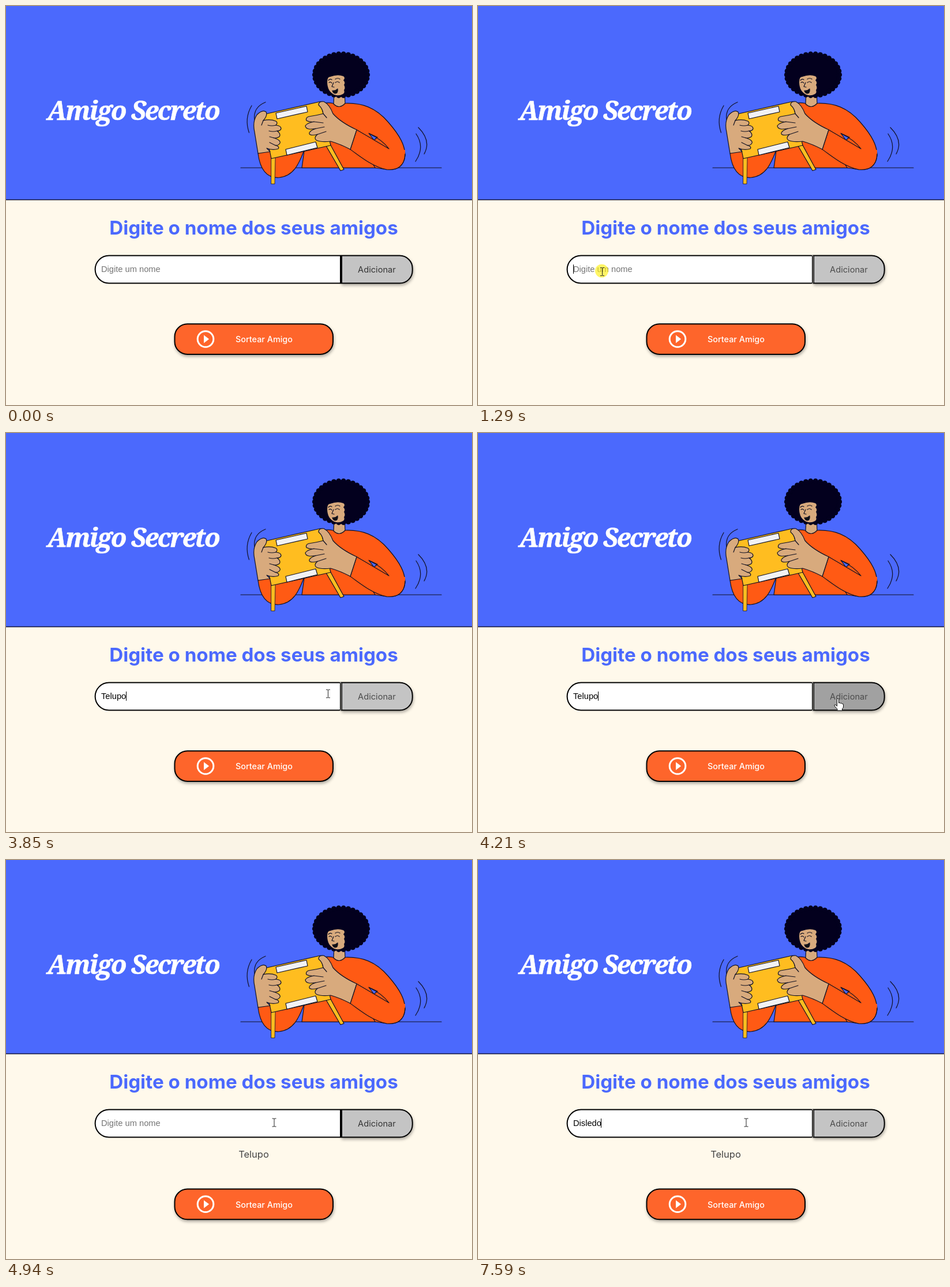
Animation of 808x693 px, one loop 8 s. Source, as an HTML page:

```html
<!DOCTYPE html>
<html lang="pt-BR">
<head>
<meta charset="utf-8">
<title>Amigo Secreto</title>
<style>
  html, body { margin: 0; width: 100%; height: 100%; overflow: hidden; background: #fff9eb; }
  svg { display: block; width: 100%; height: 100%; }
  text { font-family: Inter, "Open Sans", sans-serif; font-size: 14.67px; white-space: pre; }
  .title { font: italic 800 45px Merriweather, "Noto Serif", serif; letter-spacing: -2.3px; fill: #fff; stroke: #fff; stroke-width: .6; }
  .heading { font-size: 33.15px; font-weight: 700; fill: #4b69fd; }
  .field { font-family: Arial, "Liberation Sans", sans-serif; }
  .item { font-size: 16.5px; fill: #444; }
  .action { font-size: 14.4px; font-weight: 500; fill: #fff; }
  .mid { text-anchor: middle; }
  .art { stroke: #111122; stroke-width: 1.2; stroke-linejoin: round; stroke-linecap: round; fill: none; }
  .shirt { fill: #ff5a14; }
  .skin { fill: #d8aa7d; }
  .box { fill: #ffbd20; }
  .tape { fill: #f2f2f4; }
  .edge { stroke: #000; stroke-width: 2; }
  .drop { filter: drop-shadow(1px 3px 2.5px rgba(0, 0, 0, .32)); }
</style>
</head>
<body>
<svg viewBox="0 0 808 693">
  <rect width="808" height="693" fill="#fff9eb"/>
  <rect width="808" height="336" fill="#4b69fd"/>
  <rect y="335.8" width="808" height="1.5" fill="#10143c"/>
  <text class="title mid" x="220.500" y="198">Amigo Secreto</text>

  <g class="art">
    <path d="M407 281H755"/>
    <path d="M426 173Q413 195 421.500 220M450 167Q428 176 431 198"/>
    <path d="M711 222Q727 245 710 270M715 211Q738 234 725 257"/>
    <!-- arm and torso -->
    <path class="shirt" d="M437 256C440 280 449 299 473 298C498 296 508 275 517 250L465 250Z"/>
    <path class="shirt" d="M513 281L518 245L545 170Q556 167 567 169Q577 178 588 169C617 168 641 176 663 202C684 226 692 243 692 260C690 279 677 286 660 284L640 281Z"/>
    <path fill="#4b69fd" d="M629 221L644 228L638 233Z"/>
    <path class="shirt" stroke="none" d="M608 215L664 248L692 250C693 276 681 286 660 284C637 278 615 262 597 249Z"/>
    <path d="M664 248Q652 232 630 222M664 248L608 215L597 249C617 264 638 280 660 284C680 286 691 277 692 257M637 276L640 281"/>
    <!-- head -->
    <path class="skin" d="M569 150L568 170Q578 180 588 169L587 148Z"/>
    <g id="hair" fill="#03001e" stroke="none"><ellipse cx="581" cy="120" rx="47" ry="38"/></g>
    <path class="skin" stroke="none" d="M557 132Q557 123 562 123Q575 118 585 122Q589 125 585 129Q589 133 586 137Q589 142 586 146Q588 151 584 153Q577 157 569 154Q557 148 557 132Z"/>
    <path d="M559 129Q562 126 565 128M571 127Q575 124 579 127M560 133Q563 131 565 134M571 133Q575 130 578 133M568 133L565 140L569 141"/>
    <path fill="#111" d="M566 147Q571 148 575 144Q576 151 571 152Q567 151 566 147Z"/>
    <!-- box -->
    <path class="box" d="M460 264L467 263L466 309L460 309Z" stroke-width=".8"/>
    <path class="box" d="M555 243L562 240L586 284L580 286Z"/>
    <path class="box" d="M444 189L545 166L563 242L460 265Z"/>
    <path class="tape" d="M468 186L521 174L523 184L470 196Z"/>
    <path class="tape" d="M485 249L537 236L540 246L487 259Z"/>
    <!-- hands -->
    <path class="skin" d="M437 256L431 219Q427 201 435 189Q445 179 451 184Q454 190 446 199Q458 196 468 200Q472 203 468 207Q477 208 477 213Q476 217 470 217Q477 222 474 227Q470 230 464 229Q477 233 475 238Q472 243 467 242Q475 244 472 248Q462 251 452 247L458 253Z"/>
    <path d="M446 199L443 207M468 207Q461 209 454 207M470 217Q463 219 456 217M464 229L457 227M467 242L457 237"/>
    <path class="skin" d="M608 215Q580 202 567 187Q561 171 551 166Q542 165 542 172Q549 178 550 187Q539 190 525 192Q519 194 521 199Q526 202 534 201Q522 203 519 208Q519 213 527 214L537 213Q525 217 526 222Q528 226 540 223Q533 229 538 233Q546 237 563 235Q580 240 597 249Z"/>
    <path d="M550 187L556 194M534 201L550 203M537 213L552 210M540 223L555 218"/>
  </g>

  <text class="heading mid" x="429.500" y="397">Digite o nome dos seus amigos</text>

  <path class="edge drop" id="add" fill="#c4c4c4" d="M582 433.600H682.700A22 22 0 0 1 704.700 455.600V459.600A22 22 0 0 1 682.700 481.600H582Z"/>
  <text class="mid" id="addText" x="643" y="463">Adicionar</text>
  <path class="edge" fill="#fff" d="M580 433.600H178.600A24 24 0 0 0 154.600 457.600A24 24 0 0 0 178.600 481.600H580Z"/>
  <path id="ring" fill="none" stroke="#d8d6d0" visibility="hidden" d="M578.500 432.600Q581 432.600 581 435V480Q581 482.600 578.500 482.600"/>
  <text class="field" id="field" x="165" y="462" fill="#757575">Digite um nome</text>
  <rect id="caret" y="449" width="1" height="16" visibility="hidden"/>
  <text class="item mid" id="item" x="429.500" y="516.500"></text>

  <g id="draw">
    <rect class="edge drop" x="292.500" y="552.300" width="274.500" height="52.700" rx="22" fill="#fe652b"/>
    <circle cx="346" cy="578.500" r="13.800" fill="none" stroke="#fff" stroke-width="3"/>
    <path fill="#fff" d="M343 571.600L352.100 578.500L343 585.400Z"/>
    <text class="action" x="398" y="584.300">Sortear Amigo</text>
  </g>

  <g id="mouse" visibility="hidden">
    <circle id="glow" cx="-1" cy="-1.500" r="11.500" fill="#ffef00" opacity=".6"/>
    <path id="beam" fill="none" stroke="#222" d="M-3.500 -7H-1Q0 -7 0 -6Q0 -7 1 -7H3.500M0 -6V6M-3.500 7H-1Q0 7 0 6Q0 7 1 7H3.500"/>
    <path id="hand" fill="#fff" stroke="#111" stroke-linejoin="round" d="M-1.500 1Q0 -1 1.500 1V8Q3 6.500 4.500 8.500Q6 7 7.500 9.500Q9.500 8.500 9.500 11V15Q9 17 7.500 18V21H-1V18.500L-6 13Q-6.500 10.500 -4 11L-1.500 13.500Z"/>
    <path id="arrow" fill="#fff" stroke="#111" d="M0 0V16L4 12.500L6.500 18L9 17L6.500 11.500H11.500Z"/>
  </g>
</svg>
<script>
const LOOP = 8000, BLINK = 535, ADDED = 4430;
const LEAD = 16; // draw what is due at the next refresh

const $ = id => document.getElementById(id);
const show = (id, on) => $(id).setAttribute('visibility', on ? 'inherit' : 'hidden');
const within = (t, a, b) => t >= a && t < b;

const entries = [
  { name: 'Telupo', focus: 1270, end: ADDED, blur: 4360, keys: [1830, 2160, 2360, 2500, 2600, 2770] },
  { name: 'Disledo', focus: 4970, end: LOOP, blur: LOOP, keys: [5570, 5840, 5970, 6110, 6180, 6680, 7590] }
];
const clicks = [[1255, 1330], [4360, 4425], [4970, 5000]];

const easeOut = u => 1 - (1 - u) ** 2;
const easeIn = u => u ** 1.3;
const smooth = u => u * u * (3 - 2 * u);
// start, end, from, to, easing
const moves = [
  [490, 1190, [0, 530], [215.5, 461.5], smooth],
  [3590, 3850, [215.5, 461.5], [552, 452], easeIn],
  [3850, 4220, [552, 452], [624, 461], easeOut],
  [4520, 4930, [624, 461], [465, 456], smooth]
];

function pointer(t) {
  const [a, b, p, q, ease] = moves.filter(m => t >= m[0]).pop() || moves[0];
  const u = ease(Math.min(1, Math.max(0, (t - a) / (b - a))));
  return p.map((v, i) => v + (q[i] - v) * u);
}

function drawField(t) {
  const entry = entries.find(e => within(t, e.focus, e.end));
  const focused = !!entry && t < entry.blur;
  const typed = entry ? entry.keys.filter(k => k <= t) : [];
  const value = entry ? entry.name.slice(0, typed.length) : '';
  const field = $('field');
  field.textContent = value || 'Digite um nome';
  field.setAttribute('fill', value ? '#000' : '#757575');
  const since = focused ? t - (typed.pop() || entry.focus) : 0;
  show('caret', focused && Math.floor(since / BLINK) % 2 === 0);
  $('caret').setAttribute('x', Math.floor(165 + (value ? field.getComputedTextLength() : 0)));
  show('ring', focused);
  $('addText').setAttribute('fill', focused ? '#4c4c4c' : '#353535');
}

function drawMouse(t) {
  const [x, y] = pointer(t);
  const visible = within(t, 500, 1600) || t >= 3610;
  const inside = y > 432 && y < 483;
  const onAdd = visible && inside && x > 581 && x < 706;
  const onField = inside && x > 154 && x <= 581;
  $('mouse').setAttribute('transform', `translate(${x} ${y})`);
  $('mouse').setAttribute('visibility', visible ? 'visible' : 'hidden');
  show('hand', onAdd);
  show('beam', onField);
  show('arrow', !onAdd && !onField);
  show('glow', clicks.some(([a, b]) => within(t, a, b)));
  $('add').setAttribute('fill', onAdd ? '#a1a1a1' : '#c4c4c4');
}

function draw(t) {
  const added = t >= ADDED;
  drawField(t);
  drawMouse(t);
  $('item').textContent = added ? entries[0].name : '';
  $('draw').setAttribute('transform', `translate(0 ${added ? 19.3 : 0})`);
}

// curly outline of the hair
for (let i = 0; i < 34; i++) {
  const a = i / 34 * Math.PI * 2;
  const curl = document.createElementNS($('hair').namespaceURI, 'circle');
  curl.setAttribute('cx', 581 + 45.5 * Math.cos(a));
  curl.setAttribute('cy', 119.5 + 36 * Math.sin(a));
  curl.setAttribute('r', 4.6);
  $('hair').append(curl);
}

function frame() {
  draw((performance.now() + LEAD) % LOOP);
  requestAnimationFrame(frame);
}
frame();
</script>
</body>
</html>
```
